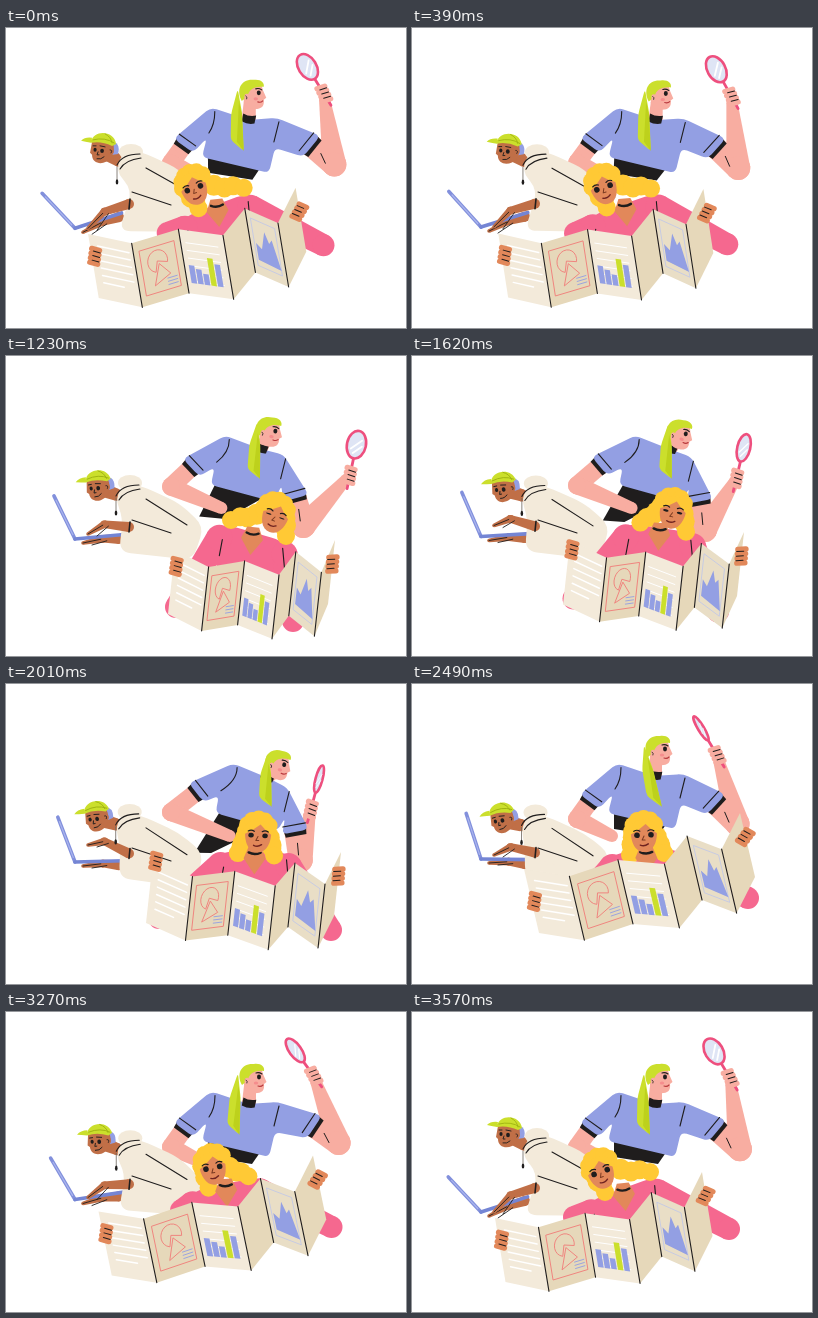
Animation, 400 px wide and 300 px high, one loop 3600 ms. Source, as an HTML page:

```html
<!DOCTYPE html>
<html lang="en">
<head>
<meta charset="utf-8">
<title>Research team</title>
<style>
html, body { margin: 0; width: 100%; height: 100%; overflow: hidden; background: #fff; }
svg { display: block; width: 100vw; height: 100vh; }
</style>
</head>
<body>
<svg id="stage" viewBox="0 0 400 300"></svg>
<script>
const LOOP = 3600, REST = 330;
const INK = '#1f1d1d', BLUE = '#939fe3', LIME = '#cbdf2c', CREAM = '#f3eada', SAND = '#e6d8ba';
const PINK = '#f5688f', ROSE = '#f8ada1', TAN = '#e2885a', BROWN = '#c06f47', GOLD = '#ffc935';
const stage = document.getElementById('stage');

// When each pose is reached; the first one rests until REST.
const arrive = [REST, 750, 1230, 2010, 2490, 2970, 3570];

// Rig controls, one value per pose. Everything else follows from these.
const rig = {
  lean: [0, 1, 1.1, 1.7, 0, 0],
  handX: [318, 342, 344, 305, 305, 297],
  handY: [66, 109, 119, 125, 71, 61],
  lensTilt: [-31, 6, 12, 15, -31, -41],
  lensW: [9, 10, 9.5, 3.5, 3, 3],
  swing: [0, 0, 0, 3, 12, -9],
  hingeY: [200, 183, 183, 178, 175, 175],
  tap: [0, -5, -5, -17, -4, -4],
  faceX: [189, 240, 269, 252, 232, 225],
  faceTilt: [-20, 0, 20, 3, -2, -3],
  elbowX: [162, 181, 170, 153, 190, 188],
  elbowY: [205, 208, 251, 234, 192, 192],
  reachX: [317, 286, 287, 325, 336, 334],
  reachY: [217, 205, 265, 246, 214, 213],
  mapX: [83, 142, 169, 147, 112, 102],
  mapW: [207, 174, 160, 188, 216, 222],
  mapY: [7, 0, -5, -24, -14, -6],
  slope: [-27, 0, 9, 12, -37, -47],
  slant: [10.5, -1, -7, -7, 15, 16],
  grip: [.34, .25, .25, .03, .5, .34]
};

function poseAt(t) {
  const next = arrive.findIndex((end, i) => i && t >= arrive[i - 1] && t < end);
  let from = 0, to = 1, k;
  if (next < 0) {
    k = -.06 * Math.sin(Math.PI * ((t + LOOP - arrive[6]) % LOOP) / (REST + LOOP - arrive[6]));
  } else {
    k = (t - arrive[next - 1]) / (arrive[next] - arrive[next - 1]);
    k *= k * (3 - 2 * k);
    from = next - 1;
    to = next % 6;
  }
  return Object.fromEntries(Object.entries(rig).map(([name, v]) => [name, v[from] + (v[to] - v[from]) * k]));
}

const add = (p, x, y) => [p[0] + x, p[1] + y];
const lerp = (a, b, k) => [a[0] + (b[0] - a[0]) * k, a[1] + (b[1] - a[1]) * k];
const polar = (p, deg, r) => add(p, r * Math.cos(deg * Math.PI / 180), r * Math.sin(deg * Math.PI / 180));
const unit = (a, b) => {
  const len = Math.hypot(b[0] - a[0], b[1] - a[1]) || 1;
  return [(b[0] - a[0]) / len, (b[1] - a[1]) / len];
};
const xy = p => p[0].toFixed(2) + ' ' + p[1].toFixed(2);
const fill = (d, c) => `<path d="${d}" fill="${c}"/>`;
const line = (d, c = INK, w = 1.1) =>
  `<path d="${d}" fill="none" stroke="${c}" stroke-width="${w}" stroke-linecap="round" stroke-linejoin="round"/>`;
const seg = (a, b) => 'M' + xy(a) + 'L' + xy(b);
const poly = pts => 'M' + pts.map(xy).join('L') + 'Z';
const oval = (p, rx, ry, c) => `<ellipse cx="${p[0]}" cy="${p[1]}" rx="${rx}" ry="${ry}" fill="${c}"/>`;
const place = (p, deg, s) => `<g transform="translate(${xy(p)}) rotate(${deg.toFixed(2)})">${s}</g>`;

// Polygon with each corner cut back by r.
function rounded(pts, r) {
  const n = pts.length;
  return pts.map((p, i) => {
    const cut = q => lerp(p, q, Math.min(.5, r / (Math.hypot(q[0] - p[0], q[1] - p[1]) || 1)));
    return (i ? 'L' : 'M') + xy(cut(pts[(i + n - 1) % n])) + 'Q' + xy(p) + ' ' + xy(cut(pts[(i + 1) % n]));
  }).join('') + 'Z';
}

function limb(a, ra, b, rb, c) {
  const [dx, dy] = unit(a, b);
  const side = (p, r) => add(p, -dy * r, dx * r);
  return fill(poly([side(a, ra), side(b, rb), side(b, -rb), side(a, -ra)]), c) + oval(a, ra, ra, c) + oval(b, rb, rb, c);
}

// Middle joint of a two-bone chain.
function joint(a, b, upper, lower) {
  const [dx, dy] = unit(a, b), dist = Math.hypot(b[0] - a[0], b[1] - a[1]);
  const u = (upper * upper - lower * lower + dist * dist) / (2 * dist);
  const h = Math.sqrt(Math.max(0, upper * upper - u * u));
  return add(a, dx * u - dy * h, dy * u + dx * h);
}

function sleeve(shoulder, elbow, len, w) {
  const [dx, dy] = unit(shoulder, elbow);
  const at = (l, s) => add(shoulder, dx * l - dy * s, dy * l + dx * s);
  return {
    pos: at(len, w), neg: at(len, -w), mid: at(len, 0),
    gap: fill(poly([at(len - 4, w - 2), at(len + 4, w - 3), at(len + 4, 3 - w), at(len - 4, 2 - w)]), INK),
    hem: line(seg(at(len - 7, w - 2), at(len - 7, 2 - w)))
  };
}

function fist(p, deg, c, dir) {
  let s = '';
  for (let i = 0; i < 4; i++) {
    const y = i * 4.6 - 7;
    s += line(`M${-4 * dir} ${y}L${4 * dir} ${y + 1}`, c, 5.4);
    if (i) s += line(`M${-2 * dir} ${y - 2.3}L${5 * dir} ${y - 1.3}`, INK, 1);
  }
  return place(p, deg, s);
}

function drawWoman(p) {
  const l = p.lean, hand = [p.handX, p.handY];
  const left = [205 + 13 * l, 79.5], right = [271 + 6 * l, 90 + 8 * l], neck = [243 + 11 * l, 92 + l];
  const hipL = [196 + 8 * l, 129], hipR = [263 + 5 * l, 145 + l], pitL = [201 + 7 * l, 110 + l];
  const head = [248 + 14.5 * l, 68 + 8.5 * l];
  const elbowL = [165, 135 - 4 * l], hip = [200 + 14 * l, 152];
  const elbowR = joint(right, hand, 74, 72 - 28 * Math.max(0, l - 1));
  const cl = sleeve(left, elbowL, 47, 12), cr = sleeve(right, elbowR, 45, 13.5);

  let s = fill(poly([add(hipL, 6, -4), add(hipR, -8, -6), [246 - 24 * l, 152 + 10 * l], [202 - 8 * l, 145 + 14 * l]]), INK);
  s += limb(cl.mid, 9, elbowL, 9, ROSE) + limb(elbowL, 9, hip, 6, ROSE);
  s += limb(cr.mid, 11, elbowR, 12, ROSE) + limb(elbowR, 12, lerp(hand, elbowR, .08), 5.5, ROSE);
  s += line(seg(lerp(cr.mid, elbowR, .4), add(lerp(cr.mid, elbowR, .6), 0, 6)), INK, 1);
  s += cl.gap + cr.gap + limb(add(head, -4, 6), 6, add(neck, 0, -1), 7, ROSE);
  s += fill(rounded([cl.pos, left, neck, right, cr.neg, cr.pos, add(right, -2, 30), hipR, hipL, pitL, cl.neg], 6), BLUE);
  s += cl.hem + cr.hem;
  s += line(`M${xy(add(left, 4, 4))}Q${xy(add(left, 4, 17))} ${xy(add(pitL, 2, -5))}`);
  s += line(seg(add(right, 2, 4), add(right, -3, 24)));
  s += place(add(neck, 0, -1), 5 + 8 * l, fill('M-6 -5Q0 -2 7 -4L6 4Q0 6 -7 3Z', INK));

  s += place(head, 8 * l,
    fill('M-10 -8C-6 -16 8 -16 9 -6L12.5 2L10 4C11 12 6 14 -2 13C-9 12 -12 4 -10 -8Z', ROSE) +
    fill('M-12 5C-18 -6 -13 -17 0 -16C7 -17 11 -13 10 -9C2 -10 -5 -7 -6 0Z', LIME) +
    oval([-7, 1], 2.4, 3.2, ROSE) + line('M-8 0Q-6 1 -7 3', INK, .8) +
    oval([5, -3], 2, 2.4, INK) + line('M2 -7Q5 -8 8 -6') + line('M4 6Q7 7 9 5', '#b8383d') +
    oval([2, 3], 2.2, 1.6, '#f58d8d'));

  const root = add(head, -16 + 3 * l, -7 - 4 * l), tip = [head[0] - 10 + p.swing, 123];
  const along = (k, x) => add(lerp(root, tip, k), x, 0);
  s += fill(rounded([root, along(.4, -9), along(.82, -12), tip, along(.4, 2)], 4), LIME);
  s += fill(poly([along(.2, 0), along(.4, 1.5), tip, along(.85, -6)]), '#bdd11c');

  s += place(hand, p.lensTilt,
    line('M0 -16L0 14', '#ee4f7e', 2.8) +
    `<ellipse cy="-31" rx="${p.lensW}" ry="14" fill="#dfe5f5" stroke="#ee4f7e" stroke-width="2.6"/>` +
    line(`M${-p.lensW * .5} -26L${p.lensW * .5} -36M${-p.lensW * .2} -22L${p.lensW * .6} -30`, '#fff', p.lensW / 5));
  return s + fist(hand, p.lensTilt * .8, ROSE, 1);
}

function drawBoy(p) {
  const up = (p.hingeY - 183) / 17;
  const hinge = [69, p.hingeY], screen = polar(hinge, 252 - 1.0 * (p.hingeY - 175), 48);
  const base = polar(hinge, -.75 * (p.hingeY - 176), 49);
  const wrist = [123, 171 + 5 * up], tip = add(hinge, 13, p.tap);
  const knuckle = add(lerp(wrist, tip, .6), 0, -7), farTip = add(hinge, 8, 4), farWrist = [113, 183 + 6 * up];
  const farMid = add(lerp(farWrist, farTip, .45), 0, -2), hood = [124 + up, 127 - 3 * up];
  const fingers = (a, b, c) => limb(a, 5, b, 3.8, BROWN) + limb(b, 3.8, c, 1.8, BROWN) +
    line(seg(lerp(b, c, .1), c), INK, .9) + line(seg(add(b, 4, 2), add(c, 9, 2)), INK, .9);

  let s = fingers(farWrist, farMid, farTip);
  s += line(seg(hinge, screen), '#8290dc', 3.6) + line(seg(hinge, base), '#7485d4', 3.6);
  s += line(seg(lerp(hinge, screen, .1), lerp(hinge, screen, .9)), '#aab5ee', 1.2);

  s += place([93 + 4 * up, 131 - 9 * up], -11 * (1 - up),
    limb([4, 4], 7, [16, 11], 6, BROWN) +
    fill('M7 -9Q18 -8 15 4L8 5Z', BLUE) +
    fill('M-11 -8L-13 3L-11 5C-11 13 -3 15 3 12C10 9 13 -2 9 -9Z', BROWN) +
    oval([8, 1], 2.8, 3.4, BROWN) + line('M7 0Q10 0 8 3', INK, .8) +
    fill('M-12 -8C-10 -20 11 -20 13 -6L9 -4Q-2 -9 -12 -7Q-18 -8 -22 -9Q-18 -13 -11 -12Z', LIME) +
    line('M-10 -10Q2 -13 11 -7', '#9fb312', .9) + line('M2 -16Q8 -13 9 -7', '#9fb312', .9) +
    oval([-8, 0], 1.6, 2, INK) + oval([-1, 1], 1.9, 2.2, INK) +
    line('M-10 -4L-7 -4M-3 -4L2 -3M-5 2L-6 5L-4 5M-6 9Q-2 10 1 7', INK, .9));

  const top = 6 * up;
  s += fill(rounded([[109, 142], [119, 127 - top], [136, 130 - top], [173, 147 - top], [198, 170], [187, 204],
    [113, 196 + 7 * up], [117 + 9 * up, 162]], 12), CREAM);
  s += oval(hood, 12, 8, CREAM);
  s += limb(wrist, 5.5, [148, 174], 8, CREAM) + fingers(wrist, knuckle, tip);
  s += line(seg(add(wrist, 1, -5), add(wrist, 0, 5)), INK, 1.6);
  s += line(seg([140, 143 - top / 2], [181, 169 - top])) + line(seg([126, 164], [165, 177]));
  s += line(`M${xy(add(hood, -14, 13))}Q${xy(add(hood, -9, 2))} ${xy(add(hood, 9, 2))}`);
  s += line(`M${xy(add(hood, -11, 17))}Q${xy(add(hood, -6, 8))} ${xy(add(hood, 10, 6))}`);
  const cord = add(hood, -14, 15);
  return s + line(seg(cord, add(cord, 0, 14)), '#6d655c', .8) + oval(add(cord, 0, 15), 1.3, 2.6, INK);
}

function drawBlonde(p) {
  const tilt = p.faceTilt, lt = Math.max(0, -tilt), rt = Math.max(0, tilt);
  const face = [p.faceX, 151 + .5 * Math.abs(tilt)], neck = add(face, -1.15 * tilt, 22);
  const left = add(polar(neck, 180 + .8 * tilt, 34), 0, 8), right = add(polar(neck, .8 * tilt, 34), 0, 6);
  const elbow = [p.elbowX, p.elbowY], reach = [p.reachX, p.reachY];

  let s = fill(rounded([add(left, -12, 0), add(left, 4, -14), add(right, -4, -14), add(right, 13, 0),
    add(neck, 38, 42), add(neck, -30, 42)], 10), PINK);
  s += limb(left, 13, elbow, 11, PINK) + limb(right, 13, reach, 11, PINK);
  s += line(seg(add(left, 3, 2), add(left, 0, 18))) + line(seg(add(right, -2, -6), add(right, 0, 16)));

  // Hair: a ring of curls and two locks that fall away from the tilt.
  const lock = (side, end) => [.25, .5, .75, 1].map((k, i) => {
    const c = lerp(add(face, side * 10, -4), end, k);
    return oval(add(c, side * (i % 2), i % 2 ? 2 : 0), 10.5 - i * .5, 10.5 - i * .5, GOLD);
  }).join('');
  s += lock(-1, add(face, -15 + lt - 1.4 * rt, 17 - .8 * rt));
  s += lock(1, add(face, 16 + 1.6 * lt - .3 * rt, 17 - lt));
  for (let a = 180; a < 360; a += 30) s += oval(polar(add(face, 0, -5), a + tilt, 13), 8, 8, GOLD);

  s += place(neck, .3 * tilt, fill('M-6 -12L6 -12L11 0L0 16L-11 0Z', TAN) + line('M-6 -6Q0 -3 6 -6', INK, 2.4));
  const lid = Math.max(.6, 2.8 * (1 - rt / 20));
  return s + place(face, tilt,
    fill('M-13 -8C-14 6 -9 16 0 16C9 16 14 6 13 -8Q0 -20 -13 -8Z', TAN) +
    fill('M-15 -1C-18 -22 18 -22 15 -1Q8 -5 2 -12Q-6 -5 -15 -1Z', GOLD) +
    oval([-7, -1], 2.8, lid, INK) + oval([7, -1], 2.8, lid, INK) +
    line('M-10 -5Q-7 -7 -4 -5M4 -5Q7 -7 10 -5', INK, 1.2) +
    line('M0 0L-2 4L1 4', '#7b3a22', 1) + line('M-4 9Q0 11 4 8', '#6f2320', 1.4));
}

function drawMap(p) {
  const zig = [199, 214, 206, 218, 194, 213, 180];
  const top = [0, .21, .435, .65, .755, .915, 1].map((u, i) =>
    [p.mapX + u * p.mapW, zig[i] + p.mapY + p.slope * u]);
  const at = (n, u, v) => add(lerp(top[n], top[n + 1], u), p.slant * v, 64 * v);
  const quad = (n, u, v, u2, v2) => poly([at(n, u, v), at(n, u2, v), at(n, u2, v2), at(n, u, v2)]);
  let s = [CREAM, SAND, CREAM, SAND, '#e9dec6', SAND].map((c, n) => fill(quad(n, 0, 0, 1, 1), c)).join('');

  for (let i = 0; i < 6; i++) {
    const v = .16 + i * .115;
    s += line(seg(at(0, .18, v), at(0, i === 5 ? .65 : .9, v)), '#fff', 1.5);
  }

  const red = '#f0857f';
  s += line(quad(1, .13, .15, .87, .85), red, 1);
  const arc = Array.from({ length: 17 }, (_, i) => {
    const a = 1.95 + i * .29;
    return at(1, .47 + .21 * Math.cos(a), .38 + .17 * Math.sin(a));
  });
  s += line('M' + arc.map(xy).join('L') + 'L' + xy(at(1, .47, .38)) + 'Z', red, 1);
  s += line(poly([at(1, .49, .43), at(1, .34, .74), at(1, .69, .62)]), red, 1);
  for (const v of [.68, .73, .78]) s += line(seg(at(1, .62, v), at(1, .82, v)), BLUE, .9);

  for (let i = 0; i < 6; i++) s += line(seg(at(2, .12, .2 + i * .12), at(2, .84, .2 + i * .12)), '#fff', 1);
  [.55, .6, .66, .4, .48].forEach((v, i) => {
    const u = .1 + i * .148;
    s += fill(quad(2, u, v, u + .125, .83), i === 3 ? LIME : BLUE);
  });

  s += line(quad(4, .14, .12, .86, .86), '#c3c9e6', .9);
  s += fill(poly([[.18, .76], [.18, .5], [.34, .56], [.5, .26], [.6, .42], [.7, .34], [.86, .78]]
    .map(q => at(4, ...q))), BLUE);

  for (let i = 1; i < 6; i++) s += line(seg(top[i], at(i, 0, 1)));
  return s + fist(add(at(0, 0, p.grip), 3, 0), 8, TAN, 1) +
    fist(at(5, 1, .37), 15 + 1.5 * p.slant, TAN, -1);
}

function render(ms) {
  const p = poseAt(ms % LOOP);
  stage.innerHTML = drawWoman(p) + drawBoy(p) + drawBlonde(p) + drawMap(p);
}

let begin;
function tick(ms) {
  begin ??= ms;
  render(ms - begin);
  requestAnimationFrame(tick);
}
render(0);
requestAnimationFrame(tick);
</script>
</body>
</html>
```
